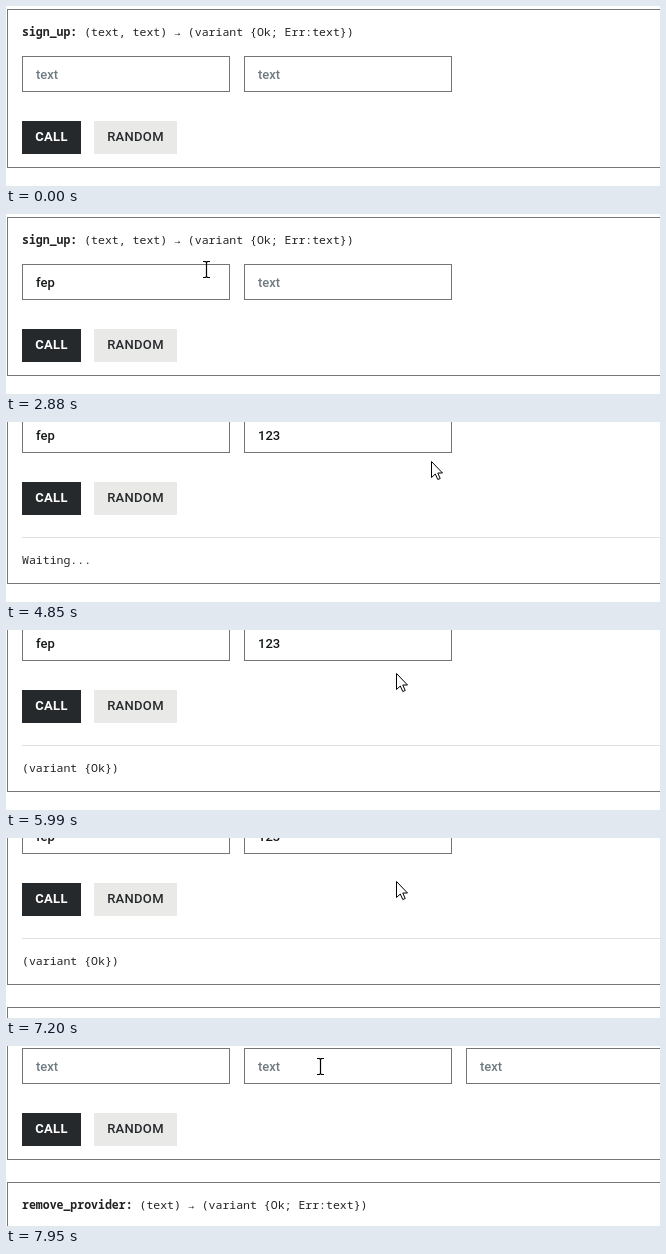
Animation, 654 px wide and 180 px high, one loop 8000 ms. Source, as an HTML page:

```html
<!DOCTYPE html>
<html lang="en">
<head>
<meta charset="utf-8">
<title>Method call form</title>
<style>
  html, body { margin: 0; width: 100%; height: 100%; overflow: hidden; background: #fff; }
  #stage { position: relative; width: 654px; height: 180px; overflow: hidden; font: 500 13px Roboto, sans-serif; }
  #stage div, #stage svg { position: absolute; box-sizing: border-box; white-space: pre; }
  #page { left: 0; top: 0; }
  .card { left: 1px; width: 760px; height: 159px; border: 1px solid #777; overflow: hidden; }
  .mono { left: 14px; font: 11.53px/20px "Noto Sans Mono", monospace; color: #222; }
  .title { top: 12px; }
  .field { top: 46px; width: 208px; height: 36px; padding-left: 13px; border: 1px solid #757575; display: flex; align-items: center; color: #15181a; }
  .hint { color: #6f7b82; }
  .caret { width: 1px; height: 15px; margin: 0 -1px 1px 0; background: #000; }
  .button { top: 111px; height: 33px; line-height: 32px; text-align: center; letter-spacing: .3px; }
  .call { left: 14px; width: 59px; background: #26292c; color: #fff; font-weight: 700; }
  .random { left: 86px; width: 83px; background: #e9e9e8; color: #26292c; }
  .divider { left: 14px; top: 166px; width: 730px; height: 1px; background: #e0e0e0; }
  .result { top: 179px; }
  #cursor { left: 0; top: 0; overflow: visible; }
</style>
</head>
<body>
<div id="stage">
  <div id="page"></div>
  <svg id="cursor" width="1" height="1" stroke="#000">
    <path id="arrow" fill="#fff" d="M.5 .5V16.5L4.3 13L6.8 18.5L9.2 17.5L6.8 12H11.5Z"/>
    <path id="beam" fill="none" stroke-width="1.2" d="M-3 -7.5h2.5l1 1l1 -1h2.5M.5 -6.5v14M-3 8.5h2.5l1 -1l1 1h2.5"/>
    <path id="hand" fill="#fff" d="M-1.5 12V1.5Q0 -.5 1.5 1.5V7Q3 5.5 4.5 7.5Q6 6.5 7.5 8Q9.500 7.500 10.500 9.500V15L8.500 20.500H0L-5.500 12.500Q-5 9.500 -1.500 12Z"/>
  </svg>
</div>
<script>
const LOOP = 8000;
const $ = id => document.getElementById(id);

function add(parent, className, text = '') {
  const el = document.createElement('div');
  el.className = className;
  el.textContent = text;
  parent.append(el);
  return el;
}

function addField(card, index) {
  const field = add(card, 'field');
  field.style.left = [14, 236, 458][index] + 'px';
  const [value, caret, hint] = ['value', 'caret', 'hint'].map(name => {
    const span = document.createElement('span');
    span.className = name;
    field.append(span);
    return span;
  });
  hint.textContent = 'text';
  caret.hidden = true;
  return (text, focused) => {
    value.textContent = text;
    hint.textContent = text ? '' : 'text';
    caret.hidden = !focused;
  };
}

function addCard(top, name, count) {
  const card = add($('page'), 'card');
  card.style.top = top + 'px';
  const title = add(card, 'mono title');
  const bold = document.createElement('b');
  bold.textContent = name + ':';
  const args = Array(count).fill('text').join(', ');
  title.append(bold, ` (${args}) → (variant {Ok; Err:text})`);
  const fields = Array.from({ length: count }, (_, i) => addField(card, i));
  add(card, 'button call', 'CALL');
  add(card, 'button random', 'RANDOM');
  return { card, fields };
}

const signUp = addCard(3, 'sign_up', 2);
addCard(239, 'sign_in', 2);
addCard(420, 'set_provider', 1);
addCard(601, 'add_provider', 3);
addCard(782, 'remove_provider', 1);
add(signUp.card, 'divider');
const result = add(signUp.card, 'mono result');

// Held values: [start time, value]
const scroll = [[0, 0], [3760, 15], [3830, 35], [3900, 49], [3970, 55], [6980, 11], [7050, 0],
  [7200, 70], [7270, 180], [7400, 335], [7470, 470], [7540, 580], [7610, 646]];
const user = [[0, ''], [1870, 'f'], [1980, 'fe'], [2090, 'fep']];
const pass = [[0, ''], [3010, '1'], [3080, '12'], [3220, '123']];
const output = [[0, ''], [3690, 'Waiting...'], [5990, '(variant {Ok})']];
const focus = [[0, ''], [700, 'user'], [1230, ''], [1760, 'user'], [2350, 'pass'],
  [2880, ''], [3010, 'pass'], [3690, '']];

// Cursor moves: [first step, last step, step count, x, y, shape]
const moves = [
  [260, 260, 1, 462, 153, 'arrow'],
  [340, 630, 5, 194, 88, 'arrow'],
  [700, 700, 1, 172, 80, 'beam'],
  [810, 810, 1, 165, 77, 'beam'],
  [940, 1010, 2, 196, 57, 'beam'],
  [1080, 1080, 1, 200, 55, 'beam'],
  [3290, 3540, 4, 70, 121, 'arrow'],
  [3620, 3620, 1, 50, 131, 'hand'],
  [3830, 4240, 6, 428, 42, 'arrow'],
  [4850, 4850, 1, 425, 39, 'arrow'],
  [4920, 4920, 1, 408, 44, 'arrow'],
  [4990, 4990, 1, 390, 47, 'arrow'],
  [5320, 5460, 3, 390, 43, 'arrow'],
  [7810, 7880, 2, 340, 28, 'beam'],
  [7950, 7950, 1, 314, 20, 'beam'],
];

const at = (keys, t) => keys.findLast(([start]) => start <= t)[1];

function cursorAt(t) {
  let x = 0, y = 0, shape = '';
  for (const [start, end, count, toX, toY, kind] of moves) {
    if (t < start) break;
    const step = count > 1 ? Math.floor((t - start) / (end - start) * (count - 1) + 1e-6) + 1 : 1;
    const p = Math.min(1, step / count);
    x += (toX - x) * p;
    y += (toY - y) * p;
    shape = kind;
  }
  return { x: Math.round(x), y: Math.round(y), shape };
}

function draw(t) {
  $('page').style.top = -at(scroll, t) + 'px';
  const focused = at(focus, t);
  signUp.fields[0](at(user, t), focused === 'user');
  signUp.fields[1](at(pass, t), focused === 'pass');
  result.textContent = at(output, t);
  signUp.card.style.height = (result.textContent ? 214 : 159) + 'px';

  const { x, y, shape } = cursorAt(t);
  $('cursor').style.transform = `translate(${x}px, ${y}px)`;
  for (const kind of ['arrow', 'beam', 'hand']) {
    $(kind).style.display = kind === shape ? '' : 'none';
  }
}

const begin = performance.now();
function tick() {
  draw((performance.now() - begin) % LOOP);
  requestAnimationFrame(tick);
}
tick();
</script>
</body>
</html>
```
